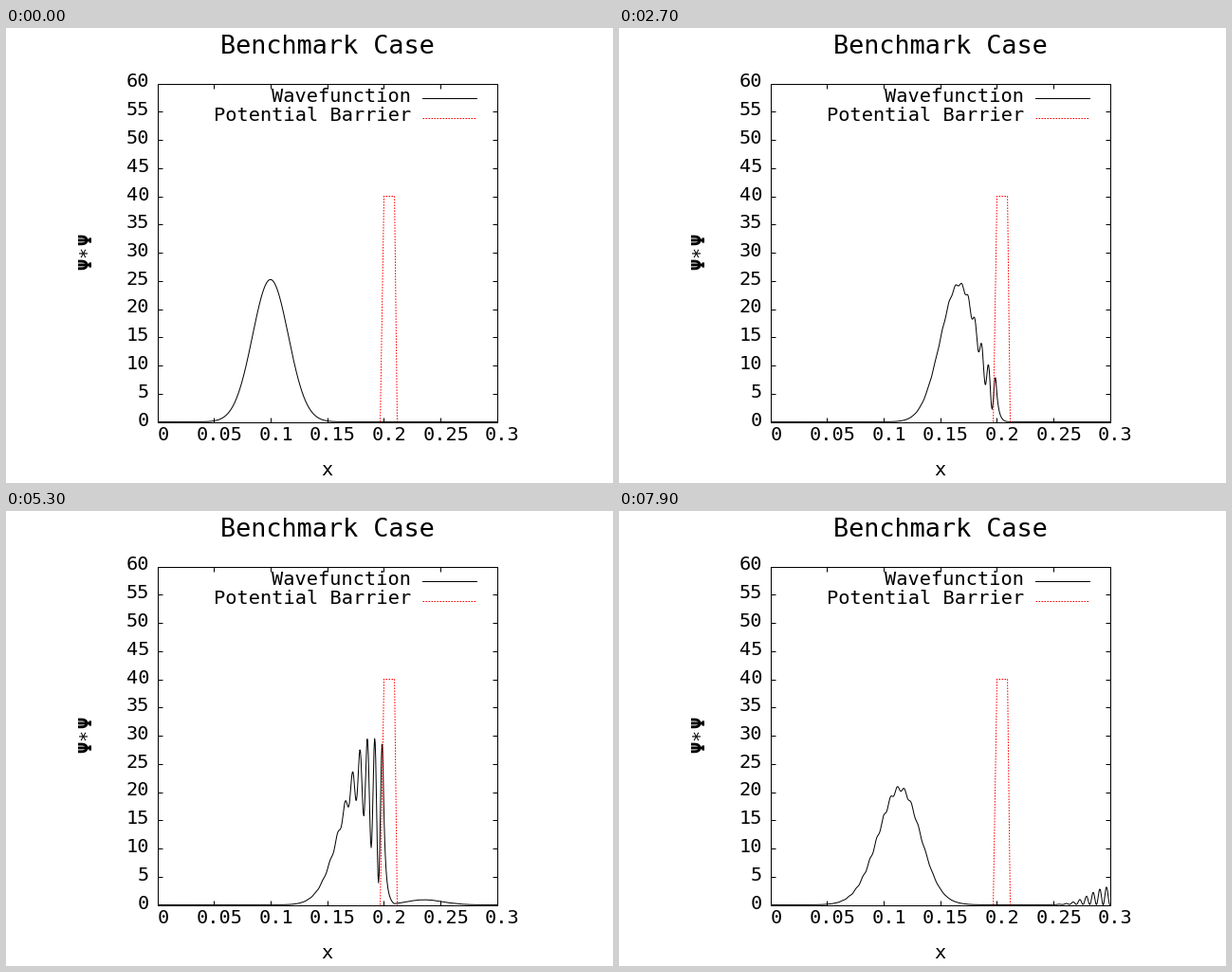
These frames come from a looping animation (640x480 px, 8 s). A matplotlib script:

```python
import numpy as np
import matplotlib
import matplotlib.pyplot as plt
from matplotlib.animation import FuncAnimation
from matplotlib.lines import Line2D

W, H, DPI = 640, 480, 80
PX = 72 / DPI
FRAMES, STEPS = 80, 25
LEFT, RIGHT, TOP, BOTTOM = 159.5, 517.5, 58.5, 415.5
DOTS = (0, (1.6, 1.4))

matplotlib.rcParams["font.family"] = "DejaVu Sans Mono"
matplotlib.rcParams["lines.scale_dashes"] = True


def simulate():
    """Leapfrog Schrodinger solver (hbar = m = 1), one density per frame."""
    dx, dt = 5e-4, 2e-7
    x = np.arange(601) * dx
    pot = np.where((x > 0.19999) & (x < 0.21001), 1.5e5, 0.0)
    env = np.exp(-(x - 0.1) ** 2 / 0.001) / (np.pi * 0.0005) ** 0.25
    re, im = env * np.cos(500 * x), env * np.sin(500 * x)

    def energy(f):
        out = np.zeros_like(f)
        lap = f[2:] - 2 * f[1:-1] + f[:-2]
        out[1:-1] = -0.5 * lap / dx ** 2 + pot[1:-1] * f[1:-1]
        return out

    densities = []
    for _ in range(FRAMES):
        densities.append(re ** 2 + im ** 2)
        for _ in range(STEPS):
            re = re + dt * energy(im)
            im = im - dt * energy(re)
    return x, densities


x, densities = simulate()

fig = plt.figure(figsize=(W / DPI, H / DPI), dpi=DPI, facecolor="white")
ax = fig.add_axes([LEFT / W, 1 - BOTTOM / H, (RIGHT - LEFT) / W, (BOTTOM - TOP) / H])
ax.set(xlim=(0, 0.3), ylim=(0, 60))
ax.set_xticks(np.arange(7) * 0.05)
ax.set_yticks(np.arange(0, 61, 5))
ax.tick_params(direction="in", length=5 * PX, width=PX, top=True, right=True,
               labelbottom=False, labelleft=False)
for spine in ax.spines.values():
    spine.set_linewidth(PX)


def text(px, py, s, ha="center", size=20.2, **kw):
    fig.text(px / W, 1 - py / H, s, ha=ha, va=kw.pop("va", "baseline"),
             fontsize=size * PX, color="black", **kw)


def key(py, **style):
    fig.add_artist(Line2D([439 / W, 496 / W], [1 - py / H] * 2, lw=PX, **style))


text(338.5, 27, "Benchmark Case", size=26.9)
text(338, 472, "x")
for i in range(7):
    px = LEFT + (RIGHT - LEFT) * i / 6
    text(px + 6, 435, f"{i * 0.05:.2g}")
for v in range(0, 61, 5):
    py = BOTTOM - (BOTTOM - TOP) * v / 60
    text(151.2, py + 4, str(v), ha="right")

# rotated axis label, heavy letters around a light star
for py, s, weight in ((249, "Ψ", "bold"), (236, "*", "normal"), (223, "Ψ", "bold")):
    text(85, py, s, va="center", rotation=90, weight=weight)

text(427.3, 77.5, "Wavefunction", ha="right")
text(427.3, 98, "Potential Barrier", ha="right")
key(73.5, color="black")
key(94.5, color="red", ls=DOTS, dash_capstyle="butt")

wave, = ax.plot(x, densities[0], color="black", lw=PX, zorder=2)
ax.plot([0.197, 0.2003, 0.2096, 0.212], [0, 40, 40, 0], color="red", lw=PX,
        ls=DOTS, dash_capstyle="butt", zorder=2.1)


def update(i):
    wave.set_ydata(densities[i])
    return wave,


anim = FuncAnimation(fig, update, frames=FRAMES, interval=100, repeat=True,
                     repeat_delay=0, blit=False)
plt.show()
```
